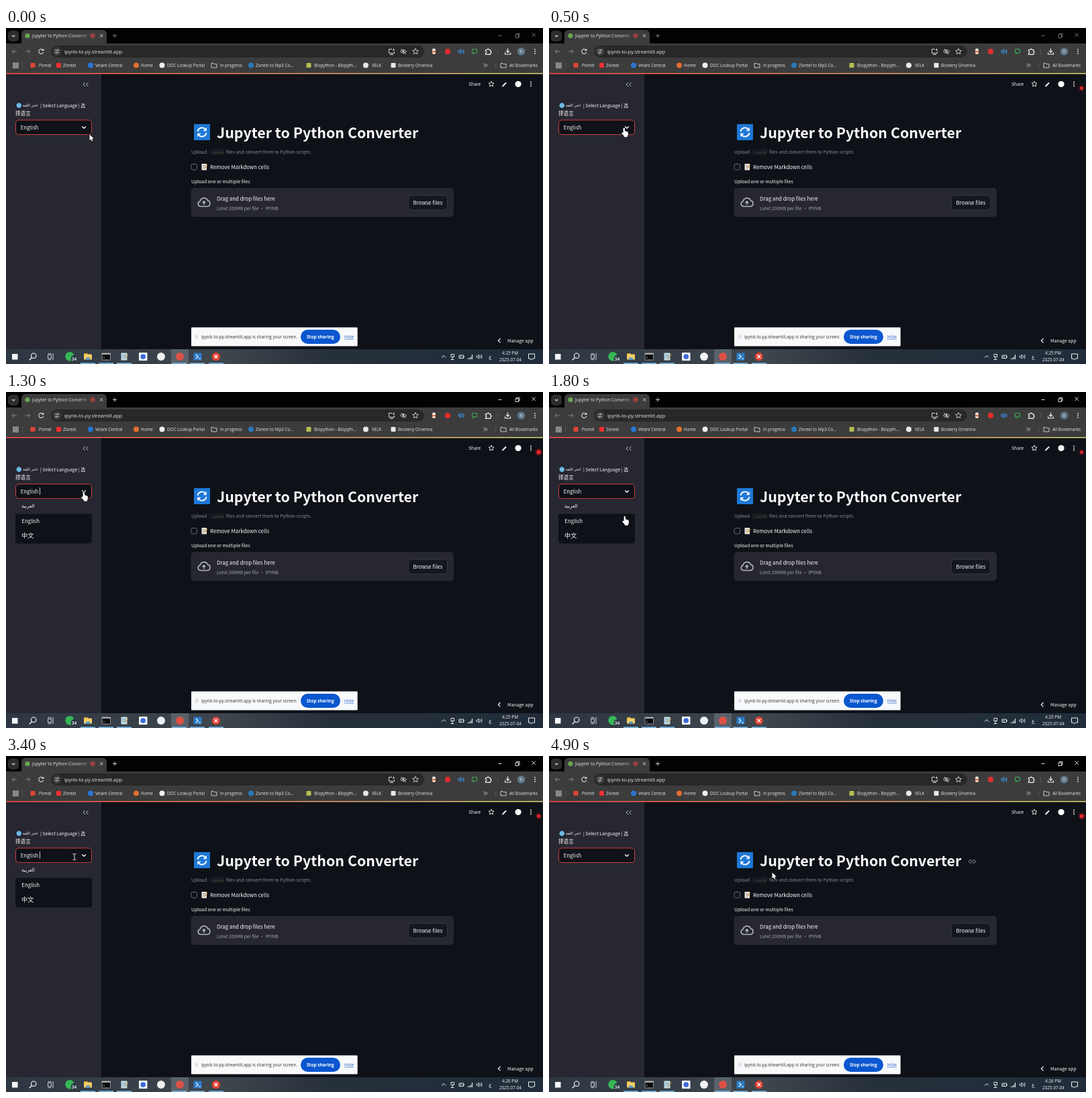
These frames come from a looping animation (800 px wide and 500 px high, 5 s). An HTML page with a canvas:

```html
<!DOCTYPE html>
<html lang="en">
<head>
<meta charset="utf-8">
<title>Notebook converter</title>
<style>
html, body { margin: 0; width: 100%; height: 100%; overflow: hidden; background: #0e1117; }
canvas { display: block; }
</style>
</head>
<body>
<canvas id="stage" width="800" height="500"></canvas>
<script>
const ctx = document.getElementById('stage').getContext('2d', { alpha: false });
const LOOP = 5000;
const UI = '"Open Sans", "Noto Sans", sans-serif';
const APP = '"Noto Sans CJK SC", "Noto Sans CJK JP", Lato, "DejaVu Sans", sans-serif';
const ARABIC = '"DejaVu Sans", sans-serif';
const MONO = '"DejaVu Sans Mono", monospace';
const PAGE = '#0e1117', PANEL = '#262730', WHITE = '#fafafa', RED = '#e24545', ICON = '#d8dadd';
const BODY = 7.85, SMALL = 6.8, TITLE = 21.4;

// Pointer tip: time, x, y
const POINTER = [
  [0, 124, 158], [300, 109, 150], [800, 116.5, 147], [1100, 116.5, 147], [1300, 116, 149],
  [1800, 113, 185], [2200, 112, 190], [2600, 101, 212], [2800, 100, 212], [2900, 100, 211],
  [3200, 102, 150], [3400, 102, 150], [4000, 110, 149], [4300, 114, 150], [4500, 118, 152],
  [4900, 332, 173]
];

function text(str, x, y, size, color = WHITE, font = APP, weight = 400, align = 'left') {
  ctx.font = `${weight} ${size}px ${font}`;
  ctx.textAlign = align;
  ctx.fillStyle = color;
  ctx.fillText(str, x, y);
}

function box(x, y, w, h, r, fill, stroke, width = 1) {
  ctx.beginPath();
  ctx.roundRect(x, y, w, h, r);
  paint(fill, stroke, width);
}

function disc(x, y, r, fill, stroke, width = 1) {
  ctx.beginPath();
  ctx.arc(x, y, r, 0, Math.PI * 2);
  paint(fill, stroke, width);
}

function paint(fill, stroke, width) {
  if (fill) { ctx.fillStyle = fill; ctx.fill(); }
  if (stroke) { ctx.strokeStyle = stroke; ctx.lineWidth = width; ctx.stroke(); }
}

function line(d, color = ICON, width = 1) {
  ctx.strokeStyle = color;
  ctx.lineWidth = width;
  ctx.stroke(new Path2D(d));
}

function shape(d, color) {
  ctx.fillStyle = color;
  ctx.fill(new Path2D(d));
}

function across(...stops) {
  const gradient = ctx.createLinearGradient(0, 0, 800, 0);
  for (const [at, color] of stops) gradient.addColorStop(at, color);
  return gradient;
}

function star(x, y, r, color) {
  ctx.beginPath();
  for (let i = 0; i < 10; i++) {
    const a = i * Math.PI / 5 - Math.PI / 2, d = i % 2 ? r * 0.48 : r;
    ctx.lineTo(x + d * Math.cos(a), y + d * Math.sin(a));
  }
  ctx.closePath();
  paint(null, color, 0.9);
}

function dots(x, y, color) {
  for (const dy of [-3, 0, 3]) disc(x, y + dy, 0.9, color);
}

function folder(x, y) {
  line(`M${x - 4} ${y - 3}h3l1 1.2h4v5.3h-8z`, ICON, 0.9);
}

function pointerAt(t) {
  const i = POINTER.findIndex(p => p[0] > t);
  if (i < 0) return POINTER.at(-1).slice(1);
  if (i === 0) return POINTER[0].slice(1);
  const [t0, x0, y0] = POINTER[i - 1], [t1, x1, y1] = POINTER[i];
  const k = (t - t0) / (t1 - t0);
  return [x0 + (x1 - x0) * k, y0 + (y1 - y0) * k];
}

function drawTabs(focused) {
  const control = focused ? '#f0f0f0' : '#77797b';
  box(0, 0, 800, 24, 0, '#020202');
  box(3, 4, 16, 16, 5, '#2c2d2e');
  line('M9 10.8l2.2 2.2l2.2-2.2', '#e3e3e3', 1.1);
  box(23, 3, 127, 24, 6, '#3c3c3c');
  disc(32, 11.5, 3.6, '#6aa84f');
  text('Jupyter to Python Converte', 39, 14, 6.5, across([0.13, '#e8e8e8'], [0.153, '#777']), UI);
  disc(129, 11.5, 3.3, null, '#e0443e', 0.9);
  disc(129, 11.5, 1.7, '#e0443e');
  line('M140 9.3l4.4 4.4m0-4.4l-4.4 4.4', '#e3e3e3', 0.9);
  line('M159 11.5h6m-3-3v6', focused ? '#e3e3e3' : '#8a8a8a', 0.9);
  line('M733.5 11.5h5m20.5-1.5h4.5v4.5h-4.5zm1.5 0v-1.5h4.5v4.5h-1.5m20-5.5l5.4 5.4m0-5.4l-5.4 5.4', control, 0.9);
}

function drawToolbar() {
  box(0, 23, 800, 45, 0, '#3c3c3c');
  line('M16 35h-7m3-3l-3 3l3 3M29 35h7m-3-3l3 3l-3 3', '#858585');
  line('M55.3 33a3.5 3.5 0 1 0 .4 3M55.8 31v2.4h-2.4', ICON, 1.1);
  box(67, 26, 556, 18, 9, '#282828');
  disc(76, 35, 6.5, '#3c3c3c');
  line('M73 33.2h2.6m2.2 0h1.2M73 36.8h1.2m2.2 0h2.6', ICON, 0.9);
  disc(76.8, 33.2, 1, null, ICON, 0.8);
  disc(75.2, 36.8, 1, null, ICON, 0.8);
  text('ipynb-to-py.streamlit.app', 87, 37.8, 7.4, '#e8e8e8', UI);
  line('M575 31.5h-4.5v6h8v-2.5M572 39.5h5M577.5 30.5v3m-1.5-1.2l1.5 1.5l1.5-1.5');
  line('M587.5 35q4.5-5 9 0q-4.5 5-9 0M588.5 31l7 8', ICON, 0.9);
  disc(592, 35, 1.4, ICON);
  star(610, 35, 4.5, ICON);

  box(635, 30.5, 5, 8.5, 2, '#eee6df');
  box(635, 34, 5, 2.5, 0, '#dc7343');
  disc(658, 35, 4.3, '#e12d2d');
  line('M674 34v2h1.5l2 2v-6l-2 2zm5.4-.7q1 1.7 0 3.4m1.6-5q2 3.3 0 6.6', '#3b8de0', 1.1);
  box(694.5, 31.5, 7, 5.5, 1, null, '#39ad57', 1.2);
  line('M696 37v2.2l2-2.2', '#39ad57');
  line('M714.5 32.5h2.3a1.4 1.4 0 0 1 2.8 0h2.1v2.2a1.4 1.4 0 0 1 0 2.8v1.8h-7.2v-2a1.4 1.4 0 0 0 0-2.8z', '#f0f0f0', 1.2);
  line('M732.5 31v8', '#5b5b5b', 0.8);
  line('M747.5 30.5v5.5m-2.5-2.2l2.5 2.5l2.5-2.5M743.5 36.5v2.5h8v-2.5', '#f0f0f0', 1.2);
  disc(767.5, 35, 5.8, '#60798a');
  text('B', 767.5, 37.2, 5.8, '#dce5eb', UI, 400, 'center');
  dots(788, 35, '#e3e3e3');
}

function drawBookmarks() {
  const y = 55.5;
  for (const [dx, dy] of [[0, 0], [4.5, 0], [0, 4.5], [4.5, 4.5]])
    box(10.7 + dx, 52 + dy, 3, 3, 0, null, ICON, 0.9);
  line('M24.5 51v9', '#5b5b5b', 0.8);
  const marks = [
    [40, '#dd4436', 49, 'Pomel', 0], [78.5, '#f22f2f', 85, 'Zivreel', 0],
    [126, '#2876d2', 133, 'Velani Central', 1], [194, '#e46e2e', 201, 'Home', 1],
    [232.5, '#eeeeee', 240, 'DOC Lookup Portal', 1], [310, null, 319, 'in progress', 0],
    [365, '#2878b8', 372, 'Zivreel to Mp3 Co...', 1], [451, '#b5bd55', 459, 'Biopython - Biopyth...', 0],
    [536, '#e8e8e8', 545, 'VELK', 1], [577, '#e8e8e8', 584, 'Bookery Orvenna', 0]
  ];
  for (const [x, color, tx, label, round] of marks) {
    if (!color) folder(x, y);
    else if (round) disc(x, y, 4, color);
    else box(x - 3.5, y - 3.5, 7, 7, 1, color);
    text(label, tx, 58, 6.3, '#e8e8e8', UI);
  }
  line('M711.5 53l2.5 2.5l-2.5 2.5m3-5l2.5 2.5l-2.5 2.5', ICON, 0.9);
  line('M729.5 51v9', '#5b5b5b', 0.8);
  folder(741, y);
  text('All Bookmarks', 750, 58, 6.3, '#e8e8e8', UI);
}

function drawPage(linkShown) {
  box(0, 68, 800, 410, 0, PAGE);
  box(0, 68, 142, 410, 0, PANEL);
  box(0, 67, 800, 1.4, 0, across([0, '#ff4b4b'], [1, '#d8d873']));

  text('Share', 689, 86.3, SMALL);
  star(723, 83.5, 4.2, WHITE);
  line('M740.5 86l4.6-4.6', WHITE, 2);
  shape('M739 87.5l.6-2.4l1.8 1.8z', WHITE);
  disc(763, 83.5, 4.6, WHITE);
  dots(782, 83.5, WHITE);

  box(280, 143, 24, 24, 1, '#1e78d7');
  line('M285.5 154a6.6 6.6 0 0 1 11.2-3.6M298.5 156a6.6 6.6 0 0 1-11.2 3.6', '#fff', 1.9);
  shape('M298.8 148v5.3h-5.3zM285.2 162v-5.3h5.3z', '#fff');
  text('Jupyter to Python Converter', 314, 163.8, TITLE, WHITE, APP, 700);
  if (linkShown)
    line('M629.6 154.8h-1.7a2.2 2.2 0 0 0 0 4.4h1.7m1.8-4.4h1.7a2.2 2.2 0 0 1 0 4.4h-1.7M628.4 157h4.2', '#898b91', 1);

  text('Upload', 276, 187.2, SMALL, '#8b8d93');
  box(302, 180, 24, 9, 2, '#151920');
  text('.ipynb', 304, 187, 5.7, '#405239', MONO);
  text('files and convert them to Python scripts.', 328, 187.2, SMALL, '#8b8d93');

  box(276, 202.5, 8.5, 8.5, 2, PAGE, '#73757c', 0.9);
  box(291.5, 202, 7.5, 9.5, 0.5, '#e7e4de');
  line('M293 204.5h4.5m-4.5 2h3.5m-3.5 2h2.5', '#8a9197', 0.7);
  line('M295.5 209l4.3-5', '#e0a33b', 1.4);
  text('Remove Markdown cells', 304, 209.5, BODY);
  text('Upload one or multiple files', 276, 231.2, SMALL);

  box(275.5, 238, 391.5, 43, 5, PANEL);
  line('M289.5 265.5a4 4 0 0 1-.3-7.8a6 6 0 0 1 11.4-.8a4.4 4.4 0 0 1-.2 8.6zM294.8 263v-5m-2.3 2.2l2.3-2.3l2.3 2.3', '#b3b5bb', 1.6);
  text('Drag and drop files here', 314, 256.8, BODY);
  text('Limit 200MB per file • IPYNB', 314, 270.5, SMALL, '#a3a5ac');
  box(599.5, 249.3, 58, 21.5, 4.5, '#131720', '#3b3e48', 0.8);
  text('Browse files', 628.5, 263, BODY, WHITE, APP, 400, 'center');

  line('M736.5 462l-3.2 3.2l3.2 3.2', WHITE, 1.2);
  text('Manage app', 747, 467.8, SMALL);
}

function drawSidebar(open, hovered, caret) {
  line('M118 81l-3 3l3 3m4.5-6l-3 3l3 3', '#b9bbc1');
  disc(19.3, 115.2, 3.7, '#4ba6da');
  line('M15.5 115.2h7.6M19.3 111.4q-3.4 3.8 0 7.6q3.4-3.8 0-7.6', '#c5e6f5', 0.5);
  text('اختر اللغة', 25, 117.4, 5.6, WHITE, ARABIC);
  text('| Select Language | 选', 51, 117.8, SMALL);
  text('择语言', 14, 130, 7.6);

  box(14.5, 137, 113, 21.6, 4.5, PAGE, RED, 0.9);
  text('English', 21.7, 150.8, BODY);
  line('M113.2 146.5l2.8 2.8l2.8-2.8', WHITE, 1.3);
  if (caret) line('M50.5 142v11', WHITE, 0.8);

  if (!open) return;
  box(14, 159.5, 114, 66, 4, PAGE);
  box(14, 159.5 + hovered * 22, 114, 22, 0, PANEL);
  text('العربية', 23, 172, 7.2, WHITE, ARABIC);
  text('English', 23.3, 194.8, BODY);
  text('中文', 23, 217.2, 9.2);
}

function drawShareBar() {
  box(276, 445.5, 247.7, 28, 1, '#f8f9fa');
  line('M283 456.5v6m2.2-6v6', '#b8bcc2', 0.8);
  text('ipynb-to-py.streamlit.app is sharing your screen.', 291, 462, 6.4, '#333', UI);
  box(439, 449, 59, 21, 10.5, '#0b57d0');
  text('Stop sharing', 468.3, 462.2, 6.5, '#fff', UI, 700, 'center');
  text('Hide', 504, 462, 6.5, '#2866cc', UI);
  line('M504 463.3h14', '#2866cc', 0.6);
}

function drawTaskbar(clock) {
  box(0, 478, 800, 22, 0, across([0, '#2d3742'], [0.4, '#3f464d'], [0.6, '#26303b'], [1, '#202c3a']));
  box(9, 485, 8.5, 8.5, 0, '#f4f6f8');
  disc(41.2, 487.7, 3.7, null, '#f4f6f8', 1.2);
  line('M38.5 490.5l-3.7 3.8', '#f4f6f8', 1.3);
  line('M62.5 486.5h5v5h-5zM62.5 484.5h5m-5 9h5M70 484v10', '#e4e7ea', 0.9);
  disc(95, 488.8, 6.8, '#38b655');
  disc(101.5, 492, 5, '#2b3640');
  text('34', 101.5, 494.5, 6.6, '#fff', UI, 600, 'center');
  box(116, 484, 6, 4, 1, '#d99e2e');
  box(116, 485.5, 12, 8, 1, '#f5cd63');
  box(119, 490.5, 6, 3, 0, '#4c9bd5');
  box(143, 484, 12.5, 10, 0.5, '#090909', '#a6adb4', 0.8);
  line('M143 485h12.5', '#d2d7db', 1.5);
  text('>_', 144.5, 491.5, 4.5, '#eee', MONO);
  box(171.5, 483.5, 9, 11, 0.5, '#bfdee6');
  line('M173 486.5h6m-6 2h6m-6 2h5', '#6799a9', 0.7);
  line('M177 493l4.5-7.5', '#dba854', 1.2);
  box(198, 483, 12.5, 12, 1, '#f1f4fb');
  disc(204.2, 489, 3.8, '#3c69dc');
  disc(231, 489, 6, '#eef0f1');
  box(246, 478, 26, 22, 0, '#58626b');
  disc(259, 489, 6, '#dd5144');
  box(279.5, 483.5, 12, 11, 1, '#2b7bc8');
  line('M283 486l3 3l-3 3m4 0h3', '#fff', 1.1);
  disc(312.8, 489, 6, '#e64032');
  line('M310.3 486.5l5 5m0-5l-5 5', '#fff', 1.3);
  for (const x of [111, 138, 165, 247, 274, 302]) box(x, 498.3, 22, 1.7, 0, '#79b6e3');

  line('M649 490.5l3-3l3 3', '#f0f2f4', 1);
  line('M663 485.5h4.5v4h-4.5zM665 489.5v4m-2.5 0h5', '#e6e9ec', 1);
  line('M675 487h6.5v4.5h-6.5zM682.5 488.5v1.5M676 489.2h3', '#e6e9ec', 1);
  line('M688.5 493v-1.5m2-.5v2m2-4v4m2-7v7', '#e6e9ec', 1.2);
  line('M701 488v2.2h1.6l2 2v-6.2l-2 2zm5.5-.5q1 1.6 0 3.2m1.6-4.8q2 3.2 0 6.4', '#e6e9ec', 0.9);
  text('ع', 721.5, 491.5, 8, '#f2f4f5', ARABIC, 400, 'center');
  text(clock, 751, 486.3, 6.4, '#f2f4f5', UI, 400, 'center');
  text('2025-07-04', 751.5, 496.3, 6.3, '#f2f4f5', UI, 400, 'center');
  line('M778.5 485h9v7h-3.3l-1.7 2l-1.5-2h-2.5z', '#f2f4f5', 1);
}

function drawBeacon(t) {
  const glow = 0.5 - 0.5 * Math.cos((t - 350) / 1400 * Math.PI * 2);
  const halo = ctx.createRadialGradient(793.5, 89.5, 1, 793.5, 89.5, 6.5);
  halo.addColorStop(0, `rgba(255,30,35,${0.2 + 0.55 * glow})`);
  halo.addColorStop(1, 'rgba(255,30,35,0)');
  disc(793.5, 89.5, 6.5, halo);
  disc(793.5, 89.5, 2.6 + 0.5 * glow, `rgb(${205 + 45 * glow},38,42)`);
}

function drawPointer(x, y, open) {
  ctx.save();
  ctx.translate(x, y);
  ctx.lineJoin = 'round';
  let outline;
  if (x > 128 || (y > 157 && !open))
    outline = 'M.5.5v8.7l2-1.8l1.4 3.2l1.5-.7l-1.3-3.1h2.7z';
  else if (y < 160 && x < 111)
    line('M-2.5-4.5q2 0 2.5 1q.5-1 2.5-1M0-4v8.2M-2.5 4.8q2 0 2.5-1q.5 1 2.5 1', '#e4e4e4', 1);
  else
    outline = 'M-1.4 7V1a1.2 1.2 0 0 1 2.4 0v3.6q1.6-.5 2 .5q1.4-.3 1.7.7q1.3 0 1.2 1.5v2.3q0 1.4-1 2.4v1.4h-5v-1.2l-3.5-4q-.7-1.5.6-1.5z';
  if (outline) {
    line(outline, '#111', 1.4);
    shape(outline, '#fff');
  }
  ctx.restore();
}

function render(now) {
  const t = Math.floor(now % LOOP / 100) * 100;
  const [x, y] = pointerAt(t);
  const open = t >= 1100 && t < 4000;
  const hovered = Math.max(0, Math.min(2, Math.floor((pointerAt(t - 200)[1] - 159) / 22)));
  const caret = open && (t - 1100) % 1000 < 500;

  drawTabs(t >= 1100);
  drawToolbar();
  drawBookmarks();
  drawPage(x > 270 && y < 180);
  drawSidebar(open, hovered, caret);
  drawShareBar();
  drawTaskbar(t < 3000 ? '4:25 PM' : '4:26 PM');
  if (t >= 100) drawBeacon(t);
  drawPointer(x, y, open);
  requestAnimationFrame(render);
}
requestAnimationFrame(render);
</script>
</body>
</html>
```
